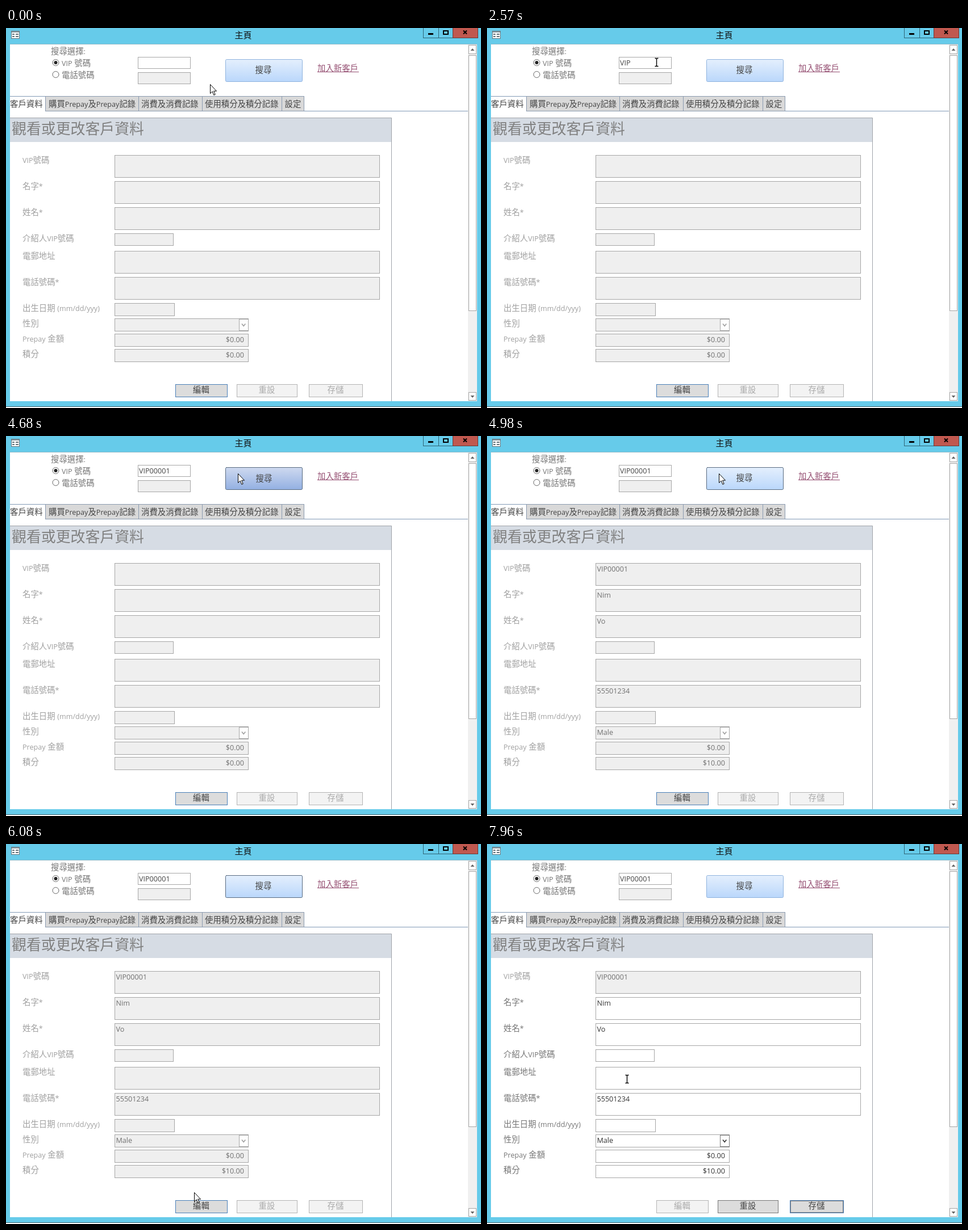
Animation of 836x670 px, one loop 8000 ms. Source, as an HTML page:

```html
<!DOCTYPE html>
<html lang="zh-Hant">
<head>
<meta charset="utf-8">
<title>主頁</title>
<style>
html, body { margin: 0; width: 100%; height: 100%; overflow: hidden; background: #fff; }
svg { display: block; width: 836px; height: 670px; }
text { font-family: "Open Sans", "Noto Sans CJK TC", "Noto Sans CJK HK", "Noto Sans CJK JP", "Noto Sans CJK", sans-serif; font-size: 14.4px; fill: #767676; }
.latin { font-size: .875em; }
.title { fill: #111; font-size: 15px; }
.heading { fill: #808080; font-size: 25.9px; font-weight: 300; }
.dark { fill: #444; }
.link { fill: #954f72; }
.box { fill: #efefef; stroke: #a6a6a6; }
.open { fill: #fff; }
.tab { fill: #d9d9d9; stroke: #8b9bb0; }

.lab { fill: #a0a0a0; }
.val { fill: #707070; }
.e1 .g1 .box, .e2 .g2 .box { fill: #fff; }
.e1 .g1 .val, .e2 .g2 .val { fill: #333; }
.e2 .g1 .lab, .e2 .g2 .lab { fill: #767676; }
.loaded, .data .empty, .focus, .blank, .caret { visibility: hidden; }
.data .loaded { visibility: visible; }
.drop { fill: #fff; stroke: #a6a6a6; }
.chev { fill: none; stroke: #a0a0a0; stroke-width: 1.6; }
.e2 .drop { stroke: #777; }
.e2 .chev { stroke: #333; }

.focus { fill: none; stroke: #222; stroke-dasharray: 1 1; }
.fSearch .search .focus, .fEdit .edit .focus, .e2 .save .focus { visibility: visible; }
.search .face { fill: url(#idle); stroke: #8fb3de; }
.press .search .face { fill: url(#down); }
.press .search text { transform: translate(1px, 1px); }

.edit .face, .e2 .turn .face { fill: #dcdcdc; stroke: #4a7fb8; }
.edit text, .e2 .turn text { fill: #444; }
.turn .face, .e2 .edit .face { fill: #f3f3f3; stroke: #b4b4b4; }
.turn text, .e2 .edit text { fill: #ababab; }
.e2 .reset .face { stroke: #777; }
.flash .blank, .blink .caret { visibility: visible; }
</style>
</head>
<body>
<script>
const LOOP = 8000;

const text = (x, y, str, cls = '', anchor = 'start') =>
  `<text x="${x}" y="${y}" class="${cls}" text-anchor="${anchor}">` +
  str.replace(/[\x21-\x7e]+/g, run => `<tspan class="latin">${run}</tspan>`) + '</text>';

// Crisp one-pixel outline that covers pixel columns x..x2 and rows y..y2
const rect = (x, y, x2, y2, cls, extra = '') =>
  `<rect x="${x + .5}" y="${y + .5}" width="${x2 - x - 1}" height="${y2 - y - 1}" class="${cls}" ${extra}/>`;

const fill = (x, y, w, h, color) => `<rect x="${x}" y="${y}" width="${w}" height="${h}" fill="${color}"/>`;

const path = (d, stroke, width = 1, inside = 'none') =>
  `<path d="${d}" stroke="${stroke}" stroke-width="${width}" fill="${inside}"/>`;

// label, top, bottom, right, group, loaded value
const fields = [
  ['VIP號碼', 224, 264, 658, 'g0', 'VIP00001'],
  ['名字*', 270, 310, 658, 'g1', 'Nim'],
  ['姓名*', 316, 356, 658, 'g1', 'Vo'],
  ['介紹人VIP號碼', 362, 384, 295, 'g1', ''],
  ['電郵地址', 393, 433, 658, 'g2', ''],
  ['電話號碼*', 439, 479, 658, 'g2', '55501234'],
  ['出生日期 (mm/dd/yyy)', 485, 508, 297, 'g2', ''],
  ['性別', 512, 535, 427, 'g2', 'Male'],
  ['Prepay 金額', 539, 562, 427, 'g2', ''],
  ['積分', 566, 589, 427, 'g2', '']
];

const field = ([label, top, bottom, right, group, value]) =>
  `<g class="${group}">` + text(29, top + 13.5, label, 'lab') + rect(191, top, right, bottom, 'box') +
  (value && text(193.5, top + 14.7, value, 'val loaded')) +
  (label === '性別' ? rect(410, 513, 427, 534, 'drop') + '<path class="chev" d="M415 521.5l3.2 4 3.2-4"/>' : '') +
  (label.startsWith('Prepay') ? text(419, 554, '$0.00', 'val', 'end') : '') +
  (label === '積分' ? text(419, 581, '$0.00', 'val empty', 'end') + text(419, 581, '$10.00', 'val loaded', 'end') : '') +
  '</g>';

const button = (cls, x, x2, label) =>
  `<g class="${cls}">` + rect(x, 628, x2, 651, 'face') + rect(x + 1, 629, x2 - 1, 650, 'focus') +
  text((x + x2) / 2 - .5, 643, label, '', 'middle') + '</g>';

const tab = (x, x2, label, tx) => rect(x, 120, x2, 147, 'tab') + text(tx, 138.5, label, 'dark');

const radio = (y, on) =>
  `<circle cx="87.5" cy="${y}" r="5.5" fill="#fff" stroke="#666"/>` +
  (on ? `<circle cx="87.5" cy="${y}" r="3" fill="#222"/>` : '');

const frame =
  fill(0, 0, 836, 667, '#66cbea') + fill(0, 667, 836, 1, '#2d5a68') + fill(7, 28, 822, 630, '#fff') +
  path('M7 28.5H829', '#8fb9c8') +
  rect(9, 5, 24, 19, '', 'fill="#fff" stroke="#66757c"') + fill(10, 6, 13, 2, '#8a9aa2') +
  fill(11, 10, 4, 2, '#66757c') + fill(11, 14, 4, 2, '#66757c') +
  fill(17, 10, 5, 2, '#66757c') + fill(17, 14, 5, 2, '#66757c') +
  text(417.5, 18, '主頁', 'title', 'middle') +
  rect(734, -1, 762, 18, '', 'fill="#66cbea" stroke="#2f6577"') +
  rect(761, -1, 787, 18, '', 'fill="#66cbea" stroke="#2f6577"') +
  rect(786, -1, 831, 18, '', 'fill="#c0584f" stroke="#6b3a38"') +
  fill(743, 9, 9, 3, '#000') + path('M770 5H778V11H770Z', '#000', 2) +
  path('M805 4.5l6 6m0-6l-6 6', '#000', 2);

const scrollbar =
  fill(813, 29, 16, 629, '#f0f0f0') +
  [[30, 46], [48, 499], [642, 657]].map(([a, b]) => rect(814, a, 828, b, '', 'fill="#fff" stroke="#a6a6a6"')).join('') +
  '<path d="M817.5 40l3.5-4 3.5 4ZM817.5 648l3.5 4 3.5-4Z" fill="#666"/>';

const searchArea =
  text(79, 45.5, '搜尋選擇:') + radio(61, true) + radio(82, false) +
  text(98, 66.5, 'VIP 號碼') + text(98, 88, '電話號碼') +
  rect(232, 51, 325, 72, 'box open') + rect(232, 78, 325, 99, 'box') +
  '<text x="234" y="65.7" class="dark"><tspan class="latin" id="typed"></tspan></text>' +
  '<rect id="caret" class="caret" y="53" width="1" height="16"/>' +
  '<g class="search">' + rect(386, 55, 522, 95, 'face', 'rx="2"') + rect(386, 55, 522, 95, 'focus', 'rx="2"') +
  text(453, 78.5, '搜尋', 'dark', 'middle') + '</g>' +
  text(548, 75.7, '加入新客戶', 'link') + path('M548 77.5H621', '#954f72');

const tabs =
  path('M69 146.5H813', '#8199b5') + path('M7 120.5H69.5V146', '#8199b5') +
  text(7, 138.5, '客戶資料', 'dark') +
  tab(69, 234, '購買Prepay及Prepay記錄', 75) + tab(233, 346, '消費及消費記錄', 238) +
  tab(345, 486, '使用積分及積分記錄', 350) + tab(485, 525, '設定', 490.5) +
  '<g class="blank">' + fill(345, 120, 140, 27, '#fff') +
  path('M346 120.5H485M345 146.5H485', '#8199b5') + '</g>';

const form =
  fill(7, 158, 672, 43, '#d6dce4') + path('M7 158.5H678.5V658', '#a0a4aa') +
  text(10, 187, '觀看或更改客戶資料', 'heading') + fields.map(field).join('') +
  button('edit', 298, 390, '編輯') + button('turn reset', 406, 513, '重設') + button('turn save', 533, 628, '存儲');

const gradient = (id, a, b) =>
  `<linearGradient id="${id}" x2="0" y2="1"><stop stop-color="${a}"/><stop offset="1" stop-color="${b}"/></linearGradient>`;

document.body.innerHTML =
  '<svg id="stage" viewBox="0 0 836 670"><defs>' +
  gradient('idle', '#e4effd', '#bad7fb') + gradient('down', '#ced9ef', '#93b0e2') + '</defs>' +
  frame + searchArea + tabs + form + scrollbar +
  '<g id="arrow">' + path('M.5 .5V16.5L4.2 13 6.8 19.3 9.2 18.3 6.6 12.2H11.5Z', '#000', 1, '#fff') + '</g>' +
  '<g id="beam">' + path('M-3-7H-1L0-6 1-7H3M-3 7H-1L0 6 1 7H3M0-6V6', '#000', 1.4) + '</g></svg>';

const [stage, typed, caret, arrow, beam] =
  ['stage', 'typed', 'caret', 'arrow', 'beam'].map(id => document.getElementById(id));

// Pointer moves: first step, last step, number of steps, x, y
const moves = [
  [370, 690, 5, 299.5, 60.5],
  [1160, 1160, 1, 298.5, 60.5],
  [4290, 4600, 5, 408, 66],
  [5340, 5400, 2, 404, 122],
  [5470, 6080, 9, 331, 614],
  [6190, 6390, 4, 330, 637],
  [7040, 7810, 11, 246.5, 421.5],
  [7910, 7960, 2, 246.5, 414.5]
];
const keyTimes = [1770, 1940, 2060, 2770, 2950, 3060, 3300, 3690];
const within = (t, a, b) => t >= a && t < b;

function pointer(t) {
  let x = 359, y = 99;
  for (const [from, to, steps, x2, y2] of moves) {
    if (t < from) break;
    const gap = (to - from) / (steps - 1) || 1;
    const done = Math.min(steps, Math.floor((t - from) / gap + 1e-6) + 1);
    const p = 1 - (1 - done / steps) ** 1.3;
    x += (x2 - x) * p;
    y += (y2 - y) * p;
  }
  return [x, y];
}

function overInput(x, y, t) {
  if (within(x, 232, 325) && within(y, 51, 72)) return true;
  return fields.some(([, top, bottom, right, group]) =>
    group !== 'g0' && t >= (group === 'g1' ? 6750 : 6820) && within(x, 191, right) && within(y, top, bottom));
}

function draw(t) {
  const flags = {
    press: within(t, 4680, 4860),
    fSearch: within(t, 4680, 6570),
    data: t >= 4950,
    flash: within(t, 5400, 5460),
    fEdit: within(t, 6570, 6820),
    e1: t >= 6750,
    e2: t >= 6820,
    blink: within(t, 70, 690) || within(t, 1360, 2570) || within(t, 2770, 4220)
  };
  for (const name in flags) stage.classList.toggle(name, flags[name]);

  const str = 'VIP00001'.slice(0, keyTimes.filter(k => t >= k).length);
  if (typed.textContent !== str) typed.textContent = str;
  caret.setAttribute('x', Math.round(234 + (str ? typed.getComputedTextLength() : 0)));

  const [x, y] = pointer(t);
  const onInput = overInput(x, y, t);
  const shown = onInput ? beam : arrow;
  arrow.style.display = onInput ? 'none' : '';
  beam.style.display = onInput ? '' : 'none';
  shown.setAttribute('transform', onInput ? `translate(${x} ${y})` : `translate(${Math.round(x)} ${Math.round(y)})`);
}

const start = performance.now();
function tick() {
  draw((performance.now() - start) % LOOP);
  requestAnimationFrame(tick);
}
tick();
</script>
</body>
</html>
```
